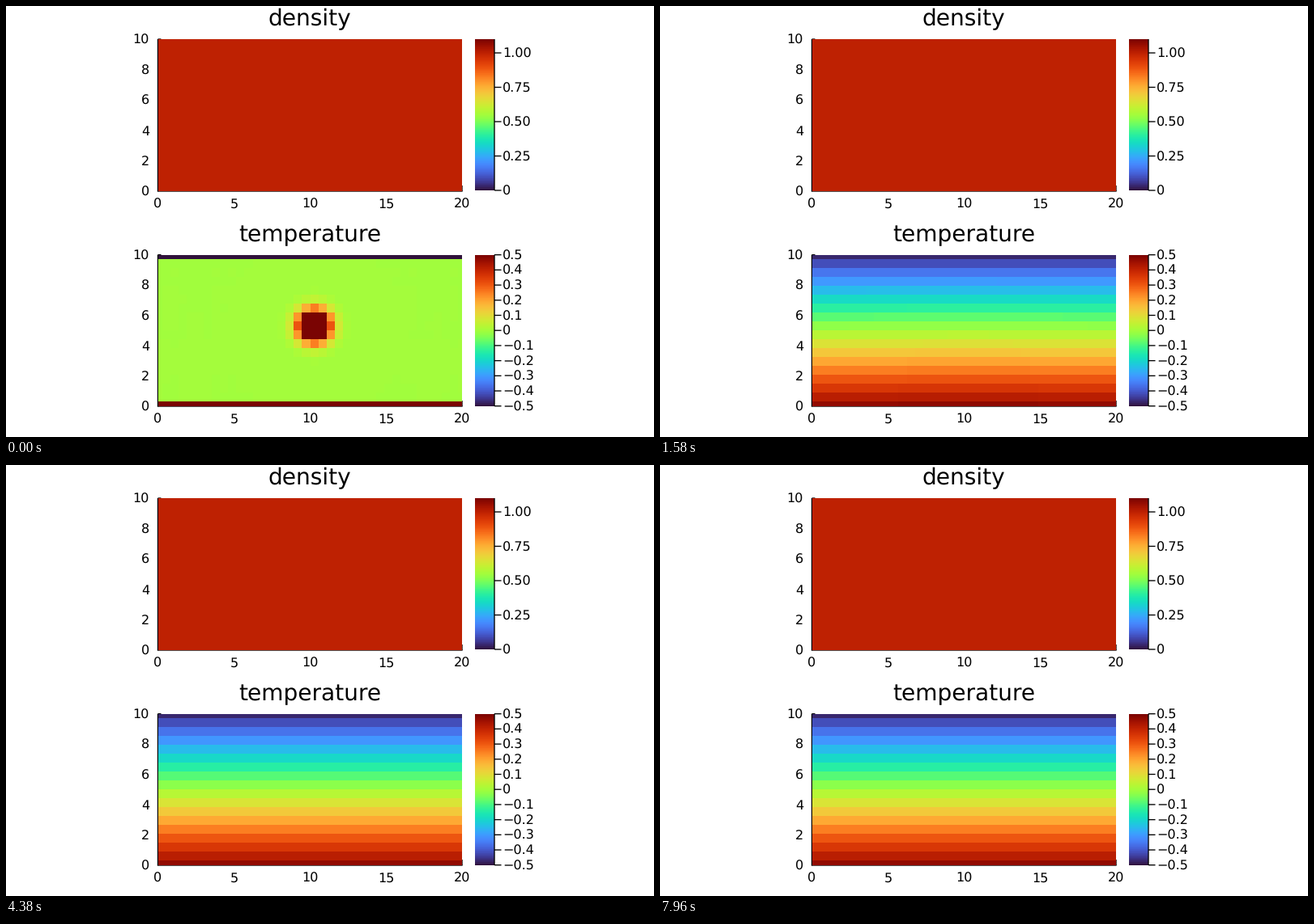
A matplotlib script that plays this animation: 800x533 px, repeating every 8000 ms.

```python
import math

import numpy as np
import matplotlib.pyplot as plt
from matplotlib.animation import FuncAnimation
from matplotlib.patches import Rectangle

W, H, DPI = 800, 533, 100
LEFT, RIGHT = 187.5, 563.0
BAR_L, BAR_R = 579, 603
NX, NY = 38, 18
FRAMES, INTERVAL = 200, 40
STEPS_PER_SEC = 24
LAST_STEP = 191
DIFFUSION = 0.48  # diffusivity times the time of one step

plt.rcParams["font.family"] = "DejaVu Sans"
plt.rcParams["text.hinting"] = "none"
fig = plt.figure(figsize=(W / DPI, H / DPI), dpi=DPI, facecolor="white")
ax = fig.add_axes([0, 0, 1, 1])
ax.axis("off")
turbo = plt.get_cmap("turbo")


def label(x, y, text, px=16, ha="center"):
    ax.text(x, y, text, fontsize=px * 72 / DPI, ha=ha, va="baseline",
            color="black")


def line(x0, y0, x1, y1, zorder=1):
    ax.plot([x0, x1], [y0, y1], color="black", lw=1.33 * 72 / DPI,
            solid_capstyle="butt", snap=False, zorder=zorder)


def frame(title, top, bottom):
    label((LEFT + RIGHT) / 2, top - 17, title, 28)
    line(LEFT, top, LEFT, bottom + 0.6)
    line(LEFT, bottom, RIGHT + 0.6, bottom)
    line(LEFT, top, LEFT + 4, top)
    line(RIGHT, bottom - 7, RIGHT, bottom)
    for v in range(0, 21, 5):
        label(LEFT + (RIGHT - LEFT) * v / 20, bottom + 21, str(v))
    for v in range(0, 11, 2):
        y = bottom + (top - bottom) * v / 10
        label(177, y + 5.8, str(v), ha="right")


def color_bar(top, bottom, lo, hi, ticks):
    ramp = np.linspace(0, 1, 256)[:, None]
    ax.imshow(ramp, cmap=turbo, extent=(BAR_L, BAR_R, bottom, top),
              origin="lower", aspect="auto", interpolation="nearest", zorder=2)
    line(BAR_R, top, BAR_R, bottom, 3)
    for value, text in ticks:
        y = bottom + (top - bottom) * (value - lo) / (hi - lo)
        line(BAR_R, y, BAR_R + 8.5, y, 3)
        label(613, y + 5.8, text, ha="left")


def laplacian(n, spacing, walls):
    """Modes of the second difference, walled half a cell out or periodic."""
    m = -2 * np.eye(n) + np.eye(n, k=1) + np.eye(n, k=-1)
    if walls:
        m[0, 0] = m[-1, -1] = -3
    else:
        m[0, -1] = m[-1, 0] = 1
    return np.linalg.eigh(m / spacing ** 2)


x = np.linspace(0, 20, NX)
y = np.linspace(0, 10, NY)
steady = np.repeat(0.5 - (np.arange(NY)[:, None] + 0.5) / NY, NX, axis=1)
start = np.exp(-(x[None, :] - x[19]) ** 2 - (y[:, None] - y[9]) ** 2)
start[0], start[-1] = 0.5, -0.5
rate_x, mode_x = laplacian(NX, x[1], False)
rate_y, mode_y = laplacian(NY, y[1], True)
weights = mode_y.T @ (start - steady) @ mode_x


def temperature(step):
    t = DIFFUSION * step
    decay = np.exp(t * (rate_y[:, None] + rate_x[None, :]))
    return steady + mode_y @ (weights * decay) @ mode_x.T


def cell_edges(n, first, last):
    u = (np.arange(n + 1) - 0.5) / (n - 1)
    return first + (last - first) * np.clip(u, 0, 1)


TOP1, BOT1, TOP2, BOT2 = 41, 229, 307.7, 495
frame("density", TOP1, BOT1)
ax.add_patch(Rectangle((LEFT + 0.5, TOP1), RIGHT - LEFT - 0.5, BOT1 - TOP1,
                       color=turbo(1 / 1.1), lw=0, zorder=2))
color_bar(TOP1, 228, 0, 1.1,
          [(0, "0"), (0.25, "0.25"), (0.5, "0.50"), (0.75, "0.75"),
           (1, "1.00")])

frame("temperature", TOP2, BOT2)
mesh = ax.pcolormesh(cell_edges(NX, LEFT + 0.5, RIGHT),
                     cell_edges(NY, BOT2, TOP2),
                     temperature(0), cmap=turbo, vmin=-0.5, vmax=0.5,
                     shading="flat", zorder=2)
tenths = [(k / 10, "0" if k == 0 else f"{k / 10:.1f}".replace("-", "\u2212"))
          for k in range(-5, 6)]
color_bar(TOP2, 494.7, -0.5, 0.5, tenths)
ax.set_xlim(0, W)
ax.set_ylim(H, 0)


def update(i):
    step = math.ceil(i * INTERVAL * STEPS_PER_SEC / 1000)
    mesh.set_array(temperature(min(step, LAST_STEP)))
    return [mesh]


anim = FuncAnimation(fig, update, frames=FRAMES, interval=INTERVAL,
                     init_func=lambda: update(0), repeat=True,
                     repeat_delay=0, blit=False)
plt.show()
```
